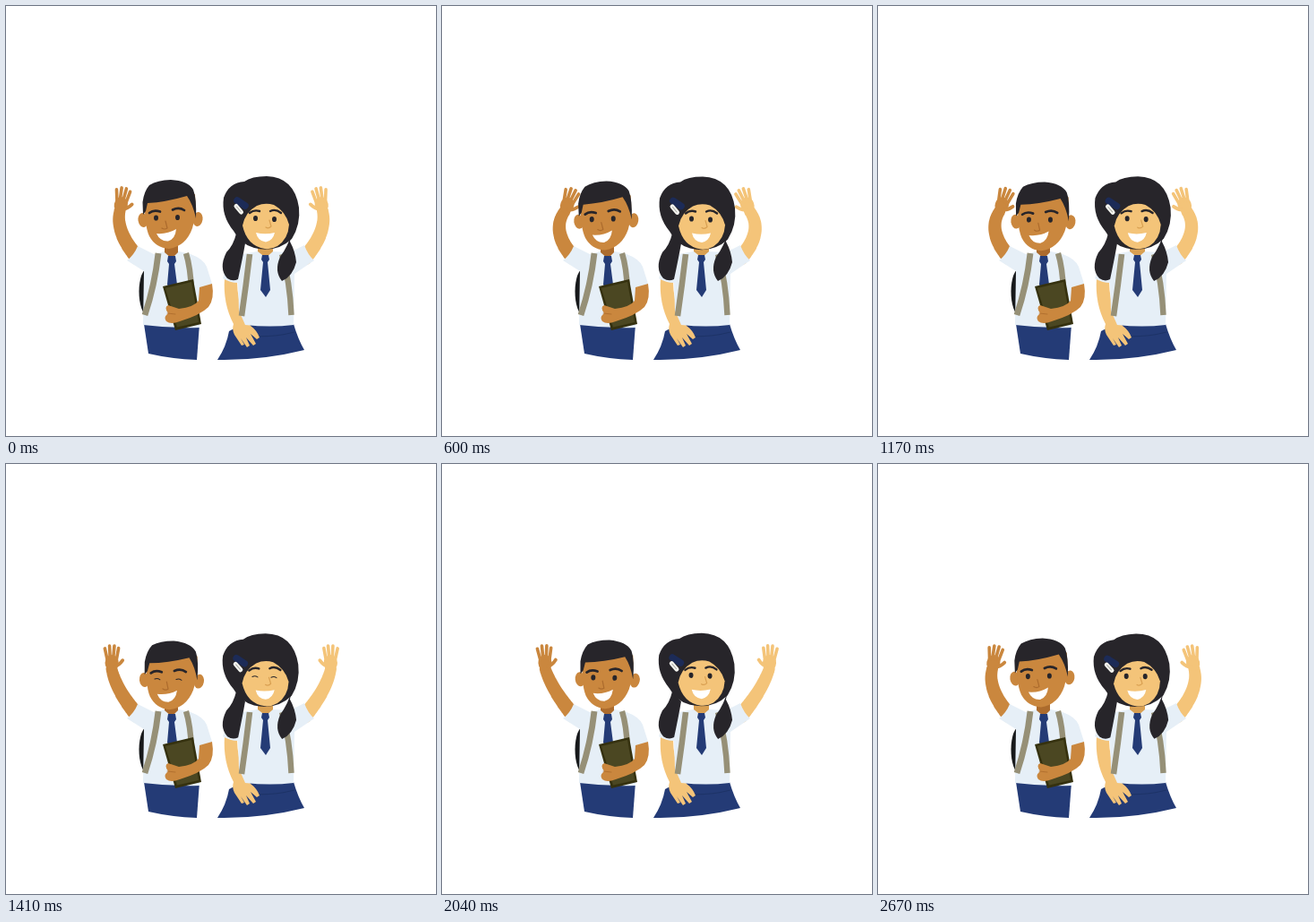
These frames come from a looping animation (480 by 480 pixels, 2700 ms). An HTML page with a canvas:

```html
<!DOCTYPE html>
<html lang="en">
<head>
<meta charset="utf-8">
<title>Waving students</title>
<style>
html, body { margin: 0; width: 100%; height: 100%; overflow: hidden; background: #fff; }
canvas { display: block; width: 480px; height: 480px; }
</style>
</head>
<body>
<canvas id="stage" width="480" height="480"></canvas>
<script>
const ctx = document.getElementById('stage').getContext('2d');
const LOOP = 2700, STEP = 30, BEAT = 300, REST = 0.6;
const C = {
  hair: '#27252a', navy: '#243b76', navyDark: '#1d3367', shirt: '#e6eff7',
  strap: '#969077', book: '#4b4722', bookEdge: '#35310f',
  boy: '#ca873e', boyShade: '#ac6b2d', girl: '#f4c479', girlShade: '#d9a052'
};

const lerp = (a, b, u) => a + (b - a) * u;
const smooth = u => u * u * (3 - 2 * u);

function fill(path, color) {
  ctx.fillStyle = color;
  ctx.fill(new Path2D(path));
}

function line(path, color, width, cap = 'round') {
  ctx.strokeStyle = color;
  ctx.lineWidth = width;
  ctx.lineCap = cap;
  ctx.lineJoin = 'round';
  ctx.stroke(new Path2D(path));
}

function oval(x, y, rx, ry, color, turn = 0) {
  ctx.fillStyle = color;
  ctx.beginPath();
  ctx.ellipse(x, y, rx, ry, turn, 0, Math.PI * 2);
  ctx.fill();
}

function group(draw) {
  ctx.save();
  draw();
  ctx.restore();
}

function turnAbout(x, y, degrees) {
  ctx.translate(x, y);
  ctx.rotate(degrees * Math.PI / 180);
  ctx.translate(-x, -y);
}

// Eased value through [time, value] pairs.
function track(keys, t) {
  const i = keys.findIndex(k => k[0] > t);
  if (i < 0) return keys[keys.length - 1][1];
  const [t0, a] = keys[i - 1], [t1, b] = keys[i];
  return lerp(a, b, smooth((t - t0) / (t1 - t0)));
}

// 0 = arm swung out, 1 = bent in; starts and ends at rest.
function waveAt(t) {
  const beat = Math.floor(t / BEAT), u = t / BEAT - beat;
  const pose = n => n === 0 || n === 9 ? REST : (n + 1) % 2;
  return lerp(pose(beat), pose(beat + 1), lerp(u, smooth(u), 0.7));
}

function openness(t, blinks) {
  const gap = Math.min(...blinks.map(b => Math.abs(t - b)));
  return gap < 45 ? 0.12 : Math.min(1, 0.12 + (gap - 45) / 75);
}

function limb(x0, y0, cx, cy, x1, y1, w0, w1, color) {
  const n = 50;
  ctx.fillStyle = color;
  ctx.beginPath();
  for (let i = 0; i <= n; i++) {
    const u = i / n, v = 1 - u;
    const x = v * v * x0 + 2 * u * v * cx + u * u * x1;
    const y = v * v * y0 + 2 * u * v * cy + u * u * y1;
    const r = lerp(w0, w1, u) / 2;
    ctx.moveTo(x + r, y);
    ctx.arc(x, y, r, 0, Math.PI * 2);
  }
  ctx.fill();
}

function wavingArm(w, color) {
  const wx = lerp(112, 137, w), wy = 229;
  limb(147, 281, lerp(123, 121, w), 252, wx, wy, 17, 13, color);
  ctx.save();
  ctx.translate(wx, wy);
  ctx.rotate(lerp(-6, 22, w) * Math.PI / 180);
  oval(0, -7, 7.6, 9, color);
  line('M-5 -10L-8 -23M-2 -12L-2.8 -26M1.500 -12L2.600 -26M5 -10L7.300 -23.500', color, 3.6);
  line('M3 -3Q8 -4 12 -10', color, 3.8);
  ctx.restore();
}

function eye(x, y, open, lid) {
  if (open < 0.3) line(`M${x - 3} ${y + 1}Q${x} ${y - 0.5} ${x + 3} ${y + 1.5}`, lid, 1);
  else oval(x, y, 2.5, 3.1 * open, C.hair);
}

function boyHead(open) {
  oval(153, 239, 5.5, 8, C.boy, -0.15);
  oval(214, 238, 5.5, 8, C.boy, 0.15);
  fill('M155 215L211 210Q213 233 208 248Q201 268 182 271Q167 270 160 257Q154 244 155 215Z', C.boy);
  fill('M153 233L152.500 219Q154 207 160 200Q169 194.500 184 194Q203 195 209 205Q213 215 212 237Q209 222 202 212Q178 219 158 220L156 229Z', C.hair);
  line('M160 231Q165 227 172 229.500', C.hair, 2.7);
  line('M186 227.500Q193 224 199 228', C.hair, 2.7);
  eye(167.5, 236.5, open, C.hair);
  eye(191.5, 236, open, C.hair);
  line('M178 240L180 248Q177 250 174 248', C.boyShade, 1.2);
  fill('M168 254Q180 255 190 249Q189 260 181 262.500Q172 263 168 254Z', '#fff');
}

function boy(t, wave) {
  oval(158, 319, 9.5, 26, '#17191b');
  wavingArm(wave, C.boy);
  fill('M154 355H216L213 395Q185 394 159 388Z', C.navy);
  fill('M147 268L165 277L177 274H193L206 277Q220 282 224 291L230 310L216 315V359Q185 360 153 356L154 296L135 284Q143 278 147 268Z', C.shirt);
  line('M170 276Q166 312 155 345', C.strap, 6.8, 'butt');
  line('M201 276Q206 292 207 318', C.strap, 6.4, 'butt');
  fill('M177 264H192V275L185 282L177 275Z', C.boyShade);
  fill('M181 279H189L190 285L188 288L191 311L185 319L180 311L182 288L180 285Z', C.navy);
  group(() => {
    const tilt = track([[0, 0], [270, -1.4], [930, 0.6], [1410, 2.5], [1830, 3.8], [2280, 0.2], [2700, -0.2]], t);
    const drop = track([[0, 0], [270, 1.5], [930, 1.5], [1410, 3.3], [1830, 3.2], [2280, 1.4], [2700, 0.5]], t);
    ctx.translate(0, drop);
    turnAbout(183, 271, tilt);
    boyHead(openness(t, [930, 1410]));
  });
  fill('M175 313L209 305L218 355L189 362Z', C.bookEdge);
  fill('M178 315L207 308L215 353L191 358.500Z', C.book);
  fill('M216 314L230 310Q233 327 226 336Q217 345 194 352Q184 356 179 352Q176 348 179 345L181 343Q176 336 181 334L193 338Q210 336 215 329Z', C.boy);
  line('M180 343L189 344', C.boyShade, 0.8);
}

function girlHead(open) {
  fill('M291 190Q274 190 266 196Q249 197 243 214Q240 234 254 251Q262 266 277 270Q302 276 319 260Q329 244 327 225Q322 191 291 190Z', C.hair);
  fill('M264 245Q267 230 280 223Q289 219 299 222Q312 229 316 244Q315 260 303 268Q296 272 289 271Q269 268 264 245Z', C.girl);
  line('M258 217L267 223', '#1c2b57', 7.6);
  line('M257 223.500L262.500 230', '#f4f4ef', 5);
  line('M257.500 224L262 229.500', '#a9aaa5', 1);
  line('M272 231Q277 227 283 229', C.hair, 2.4);
  line('M295 229Q301 226 307 231', C.hair, 2.4);
  eye(278.5, 237, open, C.hair);
  eye(299.5, 238, open, C.hair);
  line('M294 239L296 246Q293 249 290 247', C.girlShade, 1.2);
  fill('M279 253Q289 255.500 300 253Q298 262 290 263.500Q281 262.500 279 253Z', '#fff');
}

function girl(t, wave) {
  group(() => {
    ctx.translate(480.5, 0);
    ctx.scale(-1, 1);
    wavingArm(wave, C.girl);
  });
  fill('M249 363L264 355H321Q326 372 333 384Q285 396 236 395Q246 380 249 363Z', C.navy);
  line('M265 368Q295 371 322 364', C.navyDark, 1.2);
  fill('M244 304L258 307Q258 328 266 347L273 357Q280 362 283 370L280 372L273 366L279 377L276 379L268 370L272 379L269 381L262 371L266 378L263 379L255 367Q252 361 254 355Q242 332 244 304Z', C.girl);
  fill('M333 267L317 275L297 274H280L265 277Q253 281 247 292L242 304Q250 309 259 309L260 340L267 356Q295 359 321 356L322 299L344 284Q337 278 333 267Z', C.shirt);
  line('M272 277Q268 312 263 346', C.strap, 6.6, 'butt');
  line('M308 277Q317 308 318.500 345', C.strap, 6.4, 'butt');
  fill('M281 265H298V274L290 281L281 274Z', C.girlShade);
  fill('M286 278H293L294 283L292 286L295 317L290 325L284 317L287 286L285 283Z', C.navy);

  const tilt = track([[0, 0], [270, 0.3], [930, -0.2], [1410, -0.9], [1830, 0], [2280, -1.7], [2700, -2.1]], t);
  const drop = track([[0, 0], [270, 0], [930, 1], [1410, -0.7], [1830, -1.8], [2280, -0.8], [2700, -0.6]], t);
  group(() => {
    turnAbout(290, 273, tilt * 0.3);
    fill('M257 254Q254 267 246 275Q237 293 247 304Q253 308 259 305Q264 282 267 265Z', C.hair);
    fill('M319 253Q315 268 306 280Q299 296 308 307Q320 302 324 286Q323 274 317 263Z', C.hair);
  });
  group(() => {
    ctx.translate(0, drop);
    turnAbout(290, 272, tilt);
    girlHead(openness(t, [1410]));
  });
}

function frame(now) {
  const t = Math.floor((now % LOOP) / STEP) * STEP;
  const wave = waveAt(t);
  ctx.fillStyle = '#fff';
  ctx.fillRect(0, 0, 480, 480);
  boy(t, wave);
  girl(t, wave);
}

let start;
function play(now) {
  start ??= now;
  frame(now - start);
  requestAnimationFrame(play);
}
requestAnimationFrame(play);
</script>
</body>
</html>
```
